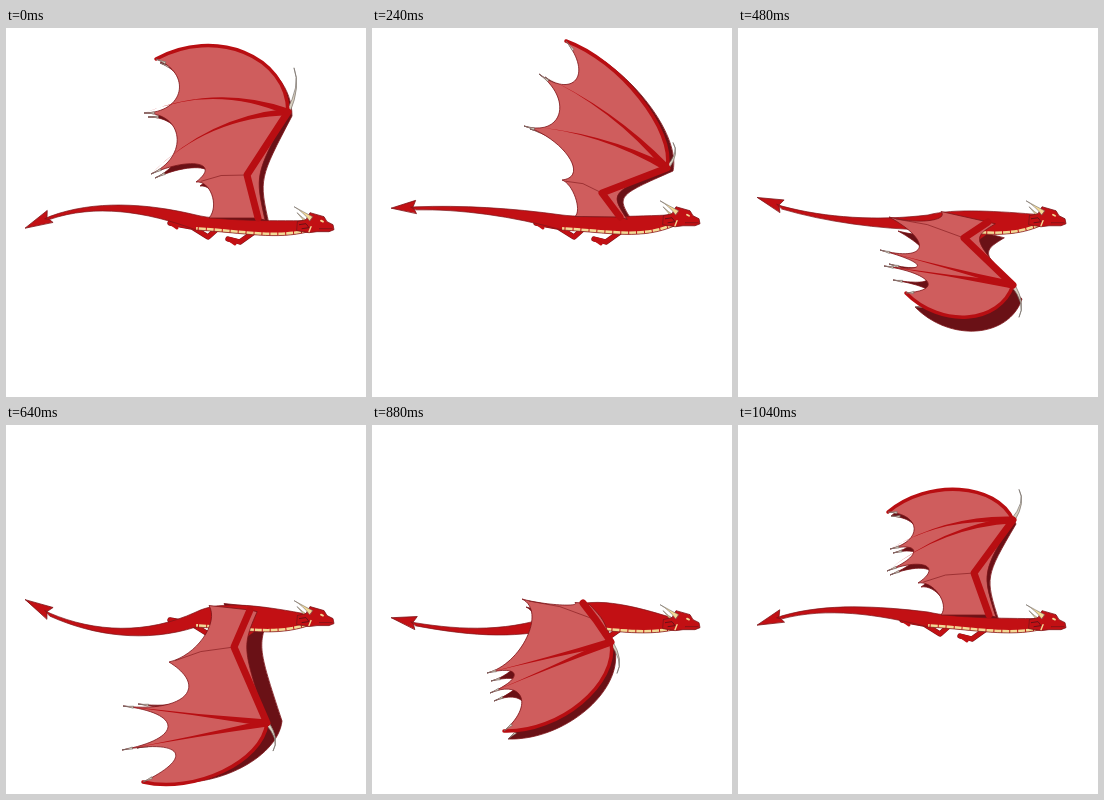
Write an HTML page with a canvas that moves like this. It is 360 by 369 pixels and loops after 1120 ms.

```html
<!DOCTYPE html>
<html lang="en">
<head>
<meta charset="utf-8">
<title>Flying dragon</title>
<style>
  html, body { margin: 0; width: 100%; height: 100%; overflow: hidden; background: #fff; }
  canvas { display: block; }
</style>
</head>
<body>
<canvas id="stage" width="360" height="369"></canvas>
<script>
const ctx = document.getElementById('stage').getContext('2d');
const RED = '#c21014', BONE = '#b80e12', PINK = '#cf5d5d', DARK = '#6a1116',
      LINE = '#7d1519', CREAM = '#f3d995', CLAW = '#d9d0c0', GREY = '#77706a';
const LOOP = 1120, STEPS = 15;

// Key poses of the wing stroke: joints, finger tips and a few shape factors.
// bow: bulge of the leading edge, cut: depth of the scallops, sag: tail height,
// lift: height of the back, far: shift of the far wing
const POSES = [
  { step: 0, wrist: [282, 84], elbow: [241, 147], shoulder: [252, 190],
    tips: [150, 31, 138, 85, 145, 146, 190, 154], bow: 52, cut: .28, sag: 172, lift: 193, far: [4, 4] },
  { step: 4, wrist: [295, 140], elbow: [230, 165], shoulder: [248, 189],
    tips: [194, 13, 167, 46, 152, 98, 190, 152], bow: 30, cut: .27, sag: 177, lift: 190, far: [6, 3] },
  { step: 6, wrist: [291, 180], elbow: [262, 189], shoulder: [275, 189],
    tips: [162, 159, 158, 171, 156, 183, 172, 187], bow: 10, cut: .17, sag: 182, lift: 185, far: [1, -1] },
  { step: 7, wrist: [275, 257], elbow: [226, 210], shoulder: [250, 194],
    tips: [168, 265, 146, 238, 142, 222, 151, 189], bow: -38, cut: .36, sag: 190, lift: 180, far: [9, 14] },
  { step: 9, wrist: [261, 298], elbow: [228, 222], shoulder: [244, 185],
    tips: [137, 357, 116, 325, 117, 281, 163, 237], bow: -33, cut: .42, sag: 207, lift: 174, far: [15, -2] },
  { step: 12, wrist: [239, 217], elbow: [224, 195], shoulder: [211, 178],
    tips: [132, 306, 118, 268, 115, 248, 150, 174], bow: -37, cut: .28, sag: 205, lift: 168, far: [4, 8] },
  { step: 14, wrist: [275, 95], elbow: [236, 148], shoulder: [251, 190],
    tips: [150, 87, 152, 124, 149, 146, 180, 158], bow: 36, cut: .27, sag: 178, lift: 193, far: [3, 4] }
];

const lerp = (a, b, k) => Array.isArray(a) ? a.map((v, i) => lerp(v, b[i], k)) : a + (b - a) * k;
const add = (p, x, y) => [p[0] + x, p[1] + y];
const wave = (step, peak) => Math.cos(2 * Math.PI * (step - peak) / STEPS);

// Point at share k of a-b, pushed sideways by the given amount
function beside(a, b, k, push) {
  const dx = b[0] - a[0], dy = b[1] - a[1], len = Math.hypot(dx, dy) || 1;
  return add(lerp(a, b, k), -dy / len * push, dx / len * push);
}

function poseAt(step) {
  const next = Math.max(1, POSES.findIndex(p => p.step >= step));
  const a = POSES[next - 1], b = POSES[next], pose = {};
  const k = (step - a.step) / (b.step - a.step);
  for (const key in a) pose[key] = lerp(a[key], b[key], k);
  pose.tips = [0, 2, 4, 6].map(i => pose.tips.slice(i, i + 2));
  pose.root = [203, (187 + pose.lift) / 2];
  pose.tail = [19, 185 + 15.5 * wave(step, -.5)];
  pose.nape = [303, 190 + 4 * wave(step, 13)];
  return pose;
}

function stroke(path, colour, width) {
  ctx.strokeStyle = colour;
  ctx.lineWidth = width;
  ctx.stroke(path);
}

function fill(path, colour, line, width = .8) {
  ctx.fillStyle = colour;
  ctx.fill(path);
  if (line) stroke(path, line, width);
}

function poly(points, close) {
  const path = new Path2D();
  points.forEach(p => path.lineTo(...p));
  if (close) path.closePath();
  return path;
}

const curve = (path, a, b, c) => path.bezierCurveTo(...a, ...b, ...c);

// Curved spike, wide at a and pointed at b
function spike(a, bend, b, width) {
  const path = new Path2D();
  path.moveTo(...beside(a, b, 0, width / 2));
  path.quadraticCurveTo(...bend, ...b);
  path.quadraticCurveTo(...bend, ...beside(a, b, 0, -width / 2));
  path.closePath();
  return path;
}

function leadingEdge(path, { wrist, tips, bow }) {
  curve(path, beside(wrist, tips[0], .15, bow), beside(wrist, tips[0], .7, bow), tips[0]);
}

function membrane(pose) {
  const { wrist, elbow, shoulder, tips, root, cut } = pose;
  const path = new Path2D(), front = add(elbow, 8, 0);
  path.moveTo(...add(shoulder, 7, 2));
  curve(path, front, front, wrist);
  leadingEdge(path, pose);
  for (let i = 1; i < 4; i++) {
    curve(path, lerp(tips[i - 1], wrist, cut), lerp(tips[i], wrist, cut), tips[i]);
  }
  curve(path, lerp(tips[3], elbow, cut), lerp(root, elbow, cut), root);
  path.lineTo(...shoulder);
  path.closePath();
  return path;
}

function drawTips({ tips, wrist }) {
  for (const tip of tips.slice(0, 3)) {
    const inner = lerp(tip, wrist, .07);
    fill(spike(inner, lerp(inner, tip, .5), tip, 2), CLAW, GREY, .6);
  }
}

function drawFarWing(pose) {
  ctx.save();
  ctx.translate(...pose.far);
  fill(membrane(pose), DARK, LINE);
  drawTips(pose);
  ctx.restore();
}

function drawNearWing(pose) {
  const { wrist, elbow, shoulder, tips, bow } = pose;
  fill(spike(wrist, add(wrist, 13, -bow * .5), add(wrist, 6, -bow * .85), 4), CLAW, GREY, .7);
  fill(membrane(pose), PINK, LINE);

  const edge = new Path2D();
  edge.moveTo(...wrist);
  leadingEdge(edge, pose);
  stroke(edge, BONE, 3.5);

  for (const tip of tips.slice(1, 3)) {
    fill(spike(wrist, beside(wrist, tip, .5, Math.max(0, bow) * .55), tip, 7), BONE);
  }
  stroke(poly([elbow, beside(elbow, tips[3], .5, 3), lerp(elbow, tips[3], .9)]), LINE, .6);
  stroke(poly([shoulder, elbow, wrist]), BONE, 7);
  drawTips(pose);
}

function drawLegs() {
  const hind = [[212, 200], [202, 209], [186, 199], [164, 195]];
  const fore = [[248, 204], [234, 214], [222, 211]];
  for (const leg of [hind, fore]) {
    const toe = leg[leg.length - 1];
    stroke(poly(leg), LINE, 5.4);
    stroke(poly(leg), RED, 4.4);
    stroke(poly([toe, add(toe, 7, 5)]), RED, 3);
  }
}

function drawBody({ tail, nape, sag, lift }) {
  const start = add(tail, 25, (sag - tail[1]) * .42);
  const hip = [190, 187], throat = add(nape, 0, 11), groin = add(hip, 0, 15);
  const bend1 = [88, sag], bend2 = [140, sag + 3];

  const arrow = [tail, beside(start, tail, 0, 6.5), beside(start, tail, .12, 0), beside(start, tail, 0, -6.5)];
  fill(poly(arrow, true), RED, LINE);

  const belly = new Path2D();
  belly.moveTo(...throat);
  curve(belly, [270, 212], [240, 205], groin);

  const shape = new Path2D();
  shape.moveTo(...lerp(start, tail, .2));
  shape.lineTo(...start);
  curve(shape, bend1, bend2, hip);
  curve(shape, [215, lift], [262, (lift + nape[1]) / 2], nape);
  shape.lineTo(...throat);
  curve(shape, [270, 212], [240, 205], groin);
  curve(shape, add(bend2, 0, 8), add(bend1, 0, 4), add(start, 0, 3));
  shape.closePath();
  fill(shape, RED);

  ctx.save();
  ctx.clip(shape);
  ctx.setLineDash([7, 1]);
  ctx.lineCap = 'butt';
  stroke(belly, CREAM, 6);
  ctx.restore();
  stroke(shape, LINE, .7);
}

function drawHead(nape) {
  ctx.save();
  ctx.translate(...nape);
  fill(spike([-1, 3], [-7, -3], [-12, -8], 4), CREAM, GREY, .6);
  fill(poly([[-12, 1], [-3, -1], [1, -8], [8, -6], [15, -4], [18, 1], [24, 4],
             [25, 9], [20, 11], [8, 11], [0, 12], [-12, 10]], true), RED, LINE);
  fill(spike([2, -2], [-6, -9], [-15, -14], 5), CREAM, GREY, .6);
  stroke(poly([[-10, 4], [-3, 3], [0, 7], [-7, 8]]), DARK, 1);
  stroke(poly([[2, 6], [0, 11]]), CREAM, 1.4);
  stroke(poly([[10, 8], [23, 8]]), LINE, .8);
  stroke(poly([[12, 0], [14, 1]]), CREAM, 1.8);
  ctx.restore();
}

function draw(step) {
  const pose = poseAt(step);
  ctx.fillStyle = '#fff';
  ctx.fillRect(0, 0, 360, 369);
  ctx.lineJoin = ctx.lineCap = 'round';
  drawFarWing(pose);
  drawLegs();
  drawBody(pose);
  drawHead(pose.nape);
  drawNearWing(pose);
}

// The first two steps last 40 ms, all others 80 ms
const stepAt = t => t < 40 ? 0 : Math.floor(t / 80) + 1;

const begin = performance.now();
function tick() {
  draw(stepAt((performance.now() - begin) % LOOP));
  requestAnimationFrame(tick);
}
tick();
</script>
</body>
</html>
```
